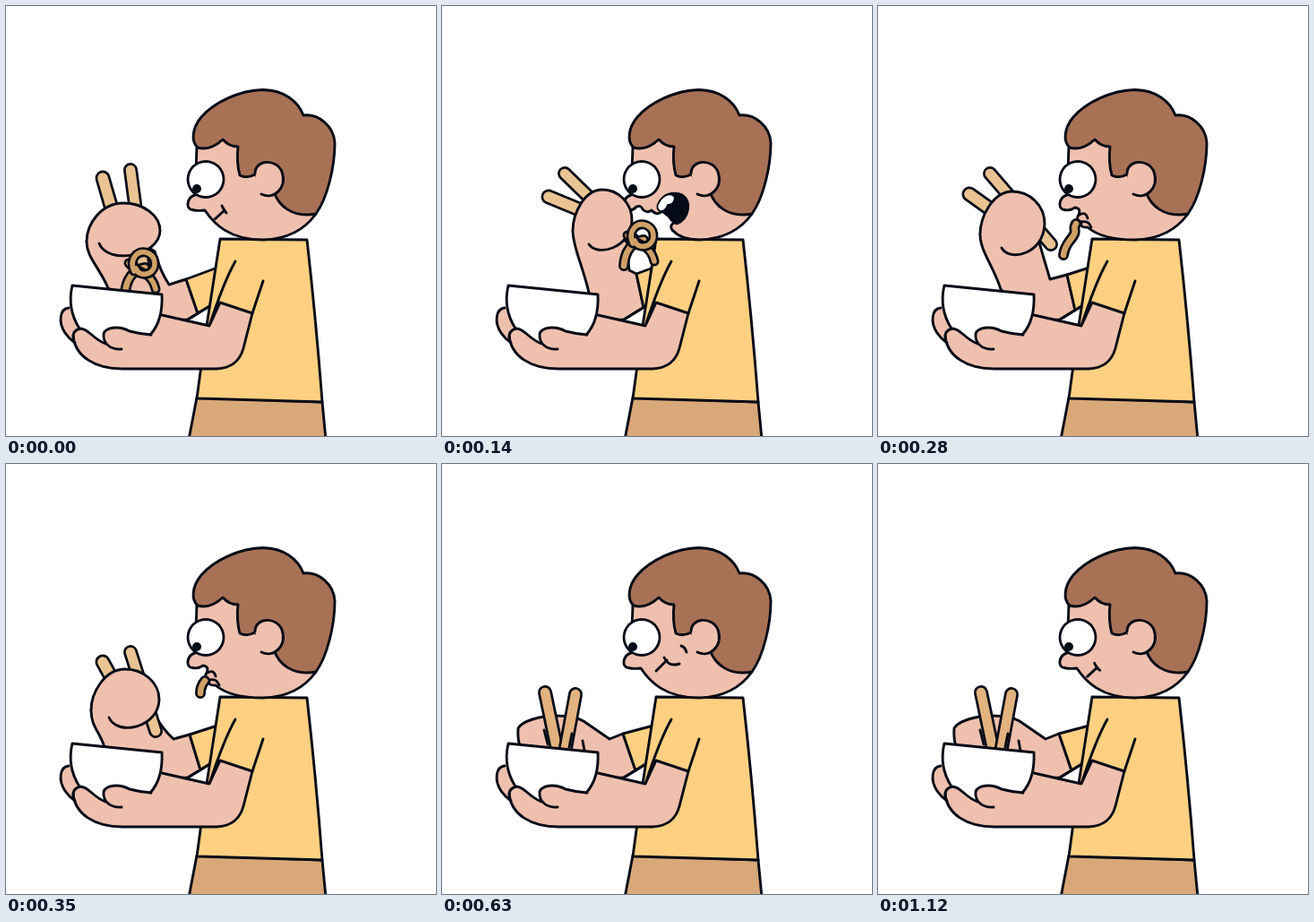
Animation of 480 by 480 pixels, one loop 1.19 s. Source, as an HTML page with a canvas:

```html
<!DOCTYPE html>
<html>
<head>
<meta charset="utf-8">
<style>
html, body { margin: 0; width: 100%; height: 100%; overflow: hidden; background: #fff; }
canvas { display: block; width: 100vw; height: 100vh; }
</style>
</head>
<body>
<canvas id="stage" width="480" height="480"></canvas>
<script>
const ctx = document.getElementById('stage').getContext('2d');
const STEP = 70, STEPS = 17;
const INK = '#040b16', SKIN = '#f0c0ae', SHIRT = '#ffd082', PANTS = '#d9a878',
      HAIR = '#a87156', WOOD = '#eac393', WET_WOOD = '#e2b27f', NOODLE = '#d0a066', WHITE = '#fff';

const mix = (a, b, k) => a + (b - a) * k;
const blend = (p, q, k) => Object.fromEntries(
  Object.keys(p).map(n => [n, p[n].map((v, i) => mix(v, q[n][i], k))]));

function shape(d, fill, line = 2.9) {
  const p = new Path2D(d);
  if (fill) { ctx.fillStyle = fill; ctx.fill(p); }
  if (line) { ctx.strokeStyle = INK; ctx.lineWidth = line; ctx.stroke(p); }
}
const ink = d => shape(d, null);

function tube(d, color, width) {
  const p = new Path2D(d);
  ctx.strokeStyle = INK;
  ctx.lineWidth = width;
  ctx.stroke(p);
  ctx.strokeStyle = color;
  ctx.lineWidth = width - 5.4;
  ctx.stroke(p);
}
const stick = (a, b, color, w) => tube(`M${a}L${b}`, color, w);

// Raised arm poses
const lift = {
  hand: [131, 251], size: [41, 31], palm: [-27, 14], inner: [114, 315],
  wrist: [166, 274], bend: [172, 296], crook: [182, 311], hemTop: [201, 305], hemEnd: [214, 343],
  a1: [108, 192], a2: [119, 230], b1: [139, 183], tip: [153, 290]
};
const eat = {
  hand: [179, 239], size: [33, 34], palm: [-15, 27], inner: [164, 320],
  wrist: [207, 262], bend: [207, 280], crook: [209, 295], hemTop: [217, 299], hemEnd: [225, 336.5],
  a1: [119, 213], a2: [165, 232], b1: [137, 187], tip: [216, 264]
};
const lower = {
  hand: [150, 243], size: [36, 36], palm: [-12, 27], inner: [137, 316],
  wrist: [180, 264], bend: [186, 285], crook: [192, 305], hemTop: [211, 300], hemEnd: [220, 339.5],
  a1: [102, 210], a2: [130, 230], b1: [125, 187], tip: [193, 266]
};
const sink = {
  hand: [133, 263], size: [38, 34], palm: [-18, 20], inner: [110, 316],
  wrist: [166, 280], bend: [174, 295], crook: [187, 307], hemTop: [205, 302], hemEnd: [217, 341.4],
  a1: [108, 221], a2: [125, 252], b1: [139, 210], tip: [167, 298]
};

// Poses with the hand in the bowl
const dip = {
  side: [92, 300], top: [129, 266], knuckle: [162, 271],
  a1: [124, 240], a2: [135, 307], b1: [157, 241], b2: [144, 301]
};
const rest = {
  side: [85, 300], top: [126, 281], knuckle: [158, 287],
  a1: [115, 255], a2: [129, 322], b1: [149, 257], b2: [137, 322]
};

function sleeve(top, end) {
  shape(`M${top}L236,292L229,334L${end}Z`, SHIRT);
  ink('M203,350L229,334');
}

function raisedArm(p) {
  const x = p.hand[0] - p.size[0], y = p.hand[1] + 12, [ix, iy] = p.inner;
  shape(`M${x},${y}C${x},${y + 18} ${mix(x, ix, .6)},${mix(y, iy, .55)} ${ix},${iy}
    L170,352L203,350L${p.hemEnd}L${p.hemTop}L${p.crook}Q${p.bend} ${p.wrist}L${p.hand}`, SKIN);
  sleeve(p.hemTop, p.hemEnd);
}

function raisedHand(p) {
  const [x, y] = p.hand, [rx, ry] = p.size;
  const ex = x + p.palm[0], ey = y + p.palm[1], left = x - rx;
  stick(p.a1, p.a2, WOOD, 17);
  stick(p.b1, p.tip, WOOD, 16);
  const outline = `M${left},${y + 12}C${left},${y - 8} ${x - rx * .6},${y - ry} ${x},${y - ry}
    A${rx},${ry} 0 0 1 ${x + rx},${y}
    C${x + rx - 1},${y + ry - 2} ${ex + 9},${y + ry + 7} ${ex},${ey}`;
  shape(outline, SKIN);
}

function noodleKnot(x, y) {
  ctx.save();
  ctx.translate(x, y);
  tube('M4,2C-9,4 -17,15 -18,31', NOODLE, 12);
  tube('M-14,-3C-5,9 11,5 16,26', NOODLE, 11);
  tube('M-8,6C-14,-8 -4,-17 5,-15C17,-12 18,3 9,8C3,11 -4,9 -6,3', NOODLE, 11);
  ctx.restore();
}

function dippedArm(p) {
  const [kx, ky] = p.knuckle, [tx, ty] = p.top, [sx, sy] = p.side;
  shape(`M${sx + 3},318Q${sx - 1},${sy + 8} ${sx},${sy - 5}C${sx + 4},${ty + 6} ${tx - 16},${ty} ${tx},${ty}
    Q${kx - 10},${ty} ${kx},${ky}L187,307L202,301L216,342L203,350L165,352`, SKIN);
  sleeve([202, 301], [216, 342]);
  stick(p.a1, p.a2, WET_WOOD, 16);
  stick(p.b1, p.b2, WET_WOOD, 16);
}

function fingers(k) {
  if (k < .7) {
    shape('M121,283Q119,292 127,296L129,305C118,302 125,317 131,319L146,319L141,306L133,307', SKIN, 2.4);
    ink('M168,289Q170,301 164,309');
  } else {
    ink('M114,297L118,313M145,301L142,316M157,309L159,320');
  }
}

function torso() {
  shape('M213,437L353,442L357,484L204,484Z', PANTS);
  shape('M239,260L336,261Q346,350 353,442L213,438L224,357Z', SHIRT);
}

function disc(x, y, r, color) {
  ctx.beginPath();
  ctx.arc(x, y, r, 0, Math.PI * 2);
  ctx.fillStyle = color;
  ctx.fill();
}

function eye() {
  disc(223, 193.5, 21.4, INK);
  disc(223, 193.5, 18.6, WHITE);
  disc(213, 204, 5, INK);
}

function chewLines(k) {
  const at = (x0, y0, x1, y1) => [mix(x0, x1, k), mix(y0, y1, k)];
  ink(`M${at(233, 238, 239, 231)}L${at(244, 228, 251, 219)}`);
  ink(`M${at(241, 223, 248, 216)}Q${at(244, 229, 253, 227)} ${at(246, 231, 265, 223)}`);
  if (k > .4) ink(`M${at(255, 212, 267, 203)}Q${at(265, 208, 271, 204)} ${at(266, 216, 273, 210)}`);
}

function head(mood, k) {
  const nose = 'M213,157L211,211C203,213 199,226 208,227.5';
  const chin = {
    open: `${nose}Q213,229 217,224Q222,222 224,227Q229,232 234,228Q240,235 246,229
      L261,241Q253,244 257,250Q267,261 287,261`,
    suck: `${nose}Q214,229 220,225Q227,226 224,233Q220,239 227,241Q225,248 234,247Q250,261 287,261`,
    chew: `${nose}Q214,229 222,228C232,243 249,261 287,261`
  }[mood];
  shape(chin + 'Q326,260 346,232L318,140L213,140', SKIN);
  if (mood === 'open') {
    shape('M246,229Q241,225 245,217C250,208 262,208 268,211C279,218 276,237 262,243Q255,240 252,232Z', INK);
    shape('M241,221Q246,211 254,210Q262,211 259,218Q257,222 252,222Q249,230 243,229Q239,226 241,221Z', WHITE, 1.8);
  } else if (mood === 'suck') {
    ink('M225,233Q232,229 234,237M227,241Q235,239 238,247');
  } else if (k === null) {
    ink('M234,237L239,232');
  } else {
    chewLines(k);
  }
  shape(`M214,158C206,151 208,136 218,124C232,108 260,94 287,93.5C310,94 326,106 332,122
    C349,120 366,134 367,153C367,179 359,214 346,232C320,237 304,223 299,207L278,188
    Q269,193 261,189Q257,174 259,157Q249,157 242,149Q228,162 214,158Z`, HAIR);
  const ear = 'M278,187C278,171 302,170 308,185C314,203 299,217 285,210';
  shape(ear, SKIN, 0);
  ink(ear);
  eye();
}

function nearArm() {
  shape('M256,285Q243,308 227,357L240,331L275,343L287,307L283,285Z', SHIRT, 0);
  shape(`M240,331L275,343L265,382Q259,404 235,405L130,405C103,405 83,395 77,376
    C67,371 60,359 61,347Q62,339 70,337L174,345L227,357Z`, SKIN, 0);
  ink('M256,285Q243,308 227,357L239,331L275,343M174,345L227,357');
  ink('M287,307L275,343L265,382Q259,404 235,405L130,405C99,405 77,391 75,368');
  ink('M70,337C60,338 58,353 66,365Q70,371 77,376');
}

function bowl() {
  shape(`M74,312L174,322C175,342 171,356 160,367Q148,366 138,363C125,356 111,359 109,366
    Q108,371 111,377C98,374 94,359 83,360C75,347 70,329 72,315Z`, WHITE, 0);
  ink('M82,360C73,346 70,329 74,312L174,322C175,342 171,356 161,367');
  ink('M75,371Q74,362 83,360C92,360 96,371 111,377');
  ink('M162,367Q149,366 138,363C125,356 111,359 109,366C108,377 117,384 129,383');
}

function slurp(len) {
  const d = ['M222,242Q217,248 217,256',
             'M221,243C216,251 225,249 214,262Q208,270 207,278',
             'M221,243C212,253 220,257 211,271Q207,281 204,290'][len];
  tube(d, NOODLE, 12);
}

const raised = [lift, blend(lift, eat, .5), eat, blend(eat, lower, .5), lower, sink];
const moods = ['chew', 'open', 'open', 'suck', 'suck', 'suck'];

function draw(i) {
  ctx.fillStyle = WHITE;
  ctx.fillRect(0, 0, 480, 480);
  const pose = raised[i];
  if (pose) {
    raisedArm(pose);
    torso();
    head(moods[i], 0);
    if (i > 2) slurp(5 - i);
    raisedHand(pose);
    if (i < 3) noodleKnot(mix(151, 221, i / 2), mix(290, 259, i / 2));
  } else {
    const k = Math.min(1, (i - 6) / 2);
    dippedArm(blend(dip, rest, k));
    fingers(k);
    torso();
    const chew = (1 + Math.cos((i - 9) * Math.PI * 2 / 5)) / 2;
    head('chew', i < 8 ? null : chew);
  }
  nearArm();
  bowl();
}

ctx.lineCap = ctx.lineJoin = 'round';
const start = performance.now();
function tick() {
  draw(Math.floor((performance.now() - start) / STEP) % STEPS);
  requestAnimationFrame(tick);
}
tick();
</script>
</body>
</html>
```
